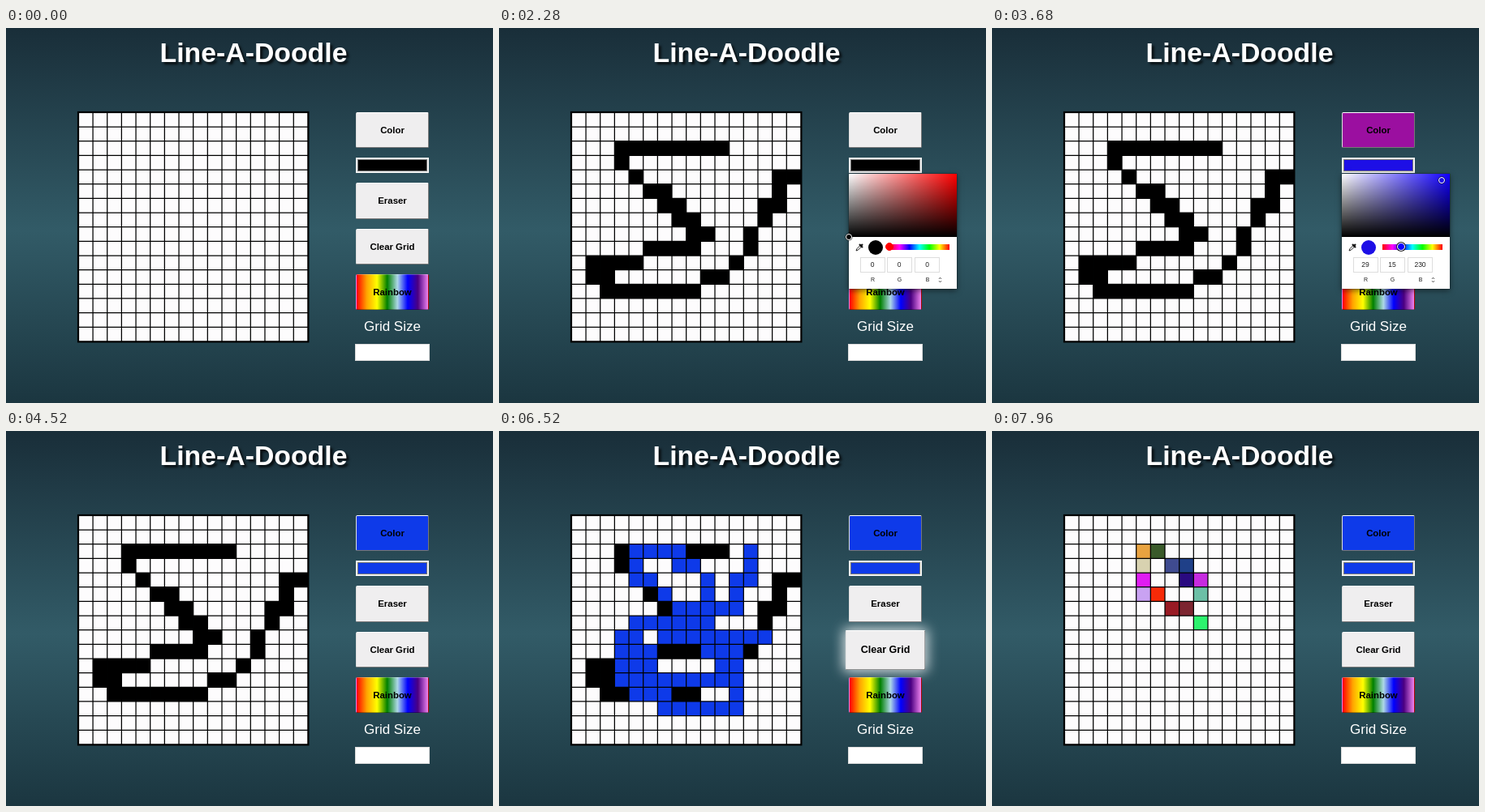
An HTML page for the animation above (8 s loop, 600 by 463 pixels).

```html
<!DOCTYPE html>
<html lang="en">
<head>
<meta charset="utf-8">
<title>Line-A-Doodle</title>
<style>
html, body { margin: 0; width: 100%; height: 100%; overflow: hidden; }
body { position: relative; font-family: "Liberation Sans", Arial, sans-serif;
  background: linear-gradient(#192e39, #325b67 54%, #1b3640); }
body > *, #picker > * { position: absolute; box-sizing: border-box; }
svg { left: 0; top: 0; width: 600px; height: 463px; overflow: visible; }
h1 { margin: 0; left: 5px; top: 10px; width: 600px; text-align: center; color: #fff;
  font: bold 33.8px/40px "Liberation Sans", Arial, sans-serif; text-shadow: 3px 3px 3px #000b; }
.btn { left: 431px; width: 90px; height: 44.5px; border: 1px solid; border-color: #fff #777 #777 #ddd;
  border-radius: 2px; background: #efeeef; color: #000; text-align: center;
  font-weight: bold; font-size: 11.4px; line-height: 42px; }
#rainbow { border-color: #fff4 #0005 #0005 #fff0;
  background: linear-gradient(90deg, red, orange, yellow, green, lightblue, blue, indigo, violet); }
#swatch { left: 431px; top: 160px; width: 90px; height: 19px; border: 2px solid #f2f2f2;
  box-shadow: inset 0 0 0 1px #777; }
#label { left: 426px; top: 358px; width: 100px; text-align: center; color: #fff; font-size: 17px; line-height: 22px; }
#size { left: 430px; top: 390px; width: 92px; height: 21px; background: #fff; border: 1px solid #ddd; }
#picker { left: 431px; top: 179.5px; width: 132.5px; height: 142px; background: #fff;
  box-shadow: 0 2px 7px #0008, 0 0 1px #000; }
#shade { left: 0; top: 0; width: 132.5px; height: 78.5px; }
#dot { width: 8px; height: 8px; border: 1.3px solid #fff; border-radius: 50%; box-shadow: 0 0 0 .7px #0009; }
#preview { left: 23.5px; top: 82px; width: 18.5px; height: 18.5px; border-radius: 50%; }
#hues { left: 49.5px; top: 87px; width: 74px; height: 7px;
  background: linear-gradient(270deg, red, #ff0, #0f0, #0ff, #00f, #f0f, red); }
#thumb { top: 85.5px; width: 10px; height: 10px; border: 1.5px solid #fff; border-radius: 50%; box-shadow: 0 0 0 1px #222; }
.field { top: 103.5px; width: 31px; height: 18.5px; border: 1px solid #ddd; font-size: 8.5px;
  line-height: 17px; text-align: center; color: #222; }
.channel { top: 126px; width: 31px; font-size: 7px; line-height: 10px; text-align: center; color: #222; }
#dropper, #spin { left: 0; top: 0; width: 132px; height: 142px; }
</style>
</head>
<body>
<h1>Line-A-Doodle</h1>
<svg id="board"></svg>
<div class="btn" id="color" style="top:103.5px">Color</div>
<div id="swatch"></div>
<div class="btn" style="top:191px">Eraser</div>
<div class="btn" id="clear" style="top:247.5px">Clear Grid</div>
<div class="btn" id="rainbow" style="top:303.5px">Rainbow</div>
<div id="label">Grid Size</div>
<div id="size"></div>
<div id="picker">
  <div id="shade"></div><div id="dot"></div>
  <svg id="dropper"><path d="M9 95l1-2.5 4-4 1.500 1.500-4 4z" fill="#fff" stroke="#222"/><path d="M13 87l4 4M15 89l2-2" stroke="#111" stroke-width="2.200"/></svg>
  <div id="preview"></div><div id="hues"></div><div id="thumb"></div>
  <svg id="spin"><path d="M111 130l1.500-2 1.500 2M111 132l1.500 2 1.500-2" fill="none" stroke="#444" stroke-width=".8"/></svg>
</div>
<script>
const LOOP = 8000, SIZE = 16, PITCH = 17.66, LEFT = 89.4, TOP = 104.4;
const CLEAR_AT = 6680, PICK_AT = 2560;
const BLUE = '#0e3ae9';
const $ = id => document.getElementById(id);

// Strokes pass through cells named by column letter and row number.
const strokes = [
  [200, 1600, '#000', 'k2 d2 d3 e4 f5 g5 g6 h6 h7 i7 i8 j8 i9 f9 e10 b10 b11 c11 c12 i12 j11 k11 l10 m9 m8 n7 n6 o6 o5 o4 p4'],
  [4600, 5000, BLUE, 'm2 m4 l4 l6 h6 g5 f4 e4 e2'],
  [5000, 5540, BLUE, 'e2 h2 h3 i3 j4 j7 e7 e8 d8 d9 e9 e10 f10 f11 k11 k8 j8'],
  [5600, 6280, BLUE, 'j8 g8 f9 d9 d10 d11 e11 e12 g12 g13 l13 l9 j9 k8 n8'],
  [7560, 7950, ['#2cf26e', '#7c2530', '#981a24', '#f62a08', '#c9a2f2', '#e01cf2', '#d8d2b0',
    '#e9a340', '#3a5a2a', '#3f4b90', '#1f4088', '#2a0a80', '#c72be0', '#6cbfa6'],
    'j7 i6 h6 g5 f5 f4 f2 g2 h3 i3 i4 j4 j5']
];

function trace(route) {
  const points = route.split(' ').map(s => [s.charCodeAt(0) - 97, +s.slice(1)]);
  const cells = [points[0]];
  for (const [x, y] of points.slice(1)) {
    let [cx, cy] = cells[cells.length - 1];
    while (cx !== x || cy !== y) {
      cx += Math.sign(x - cx);
      cy += Math.sign(y - cy);
      cells.push([cx, cy]);
    }
  }
  return cells;
}

const marks = strokes.flatMap(([start, end, color, route]) => {
  const cells = trace(route);
  return cells.map(([x, y], i) => ({
    time: start + (end - start) * i / (cells.length - 1),
    index: y * SIZE + x,
    color: Array.isArray(color) ? color[i] : color
  }));
});

function shape(name, attrs) {
  const node = document.createElementNS('http://www.w3.org/2000/svg', name);
  for (const key in attrs) node.setAttribute(key, attrs[key]);
  return $('board').appendChild(node);
}

const cells = Array.from({ length: SIZE * SIZE }, (_, i) => shape('rect', {
  x: LEFT + i % SIZE * PITCH, y: TOP + Math.floor(i / SIZE) * PITCH, width: PITCH, height: PITCH
}));
const span = SIZE * PITCH;
let lines = '';
for (let i = 1; i < SIZE; i++) {
  const at = i * PITCH;
  lines += `M${LEFT + at} ${TOP}v${span}M${LEFT} ${TOP + at}h${span}`;
}
shape('path', { d: lines, stroke: '#000', 'stroke-width': 1.25 });
shape('rect', { x: LEFT - .4, y: TOP - .4, width: span + .8, height: span + .8,
  fill: 'none', stroke: '#000', 'stroke-width': 2.2 });

const fields = [13.5, 46.5, 81].map((x, i) => {
  const add = (cls, left, text) => {
    const node = document.createElement('div');
    node.className = cls;
    node.style.left = left + 'px';
    node.textContent = text;
    return $('picker').appendChild(node);
  };
  add('channel', x + .5, 'RGB'[i]);
  return add('field', x, '');
});

// time, hue, saturation, value
const picks = [
  [PICK_AT, 360, .5, .9], [2820, 360, .6, .843], [2900, 360, .6, .843], [3240, 360, .935, .902],
  [3360, 360, .935, .902], [3600, 244, .935, .902], [3720, 244, .935, .902], [3900, 228, .94, .914]
];

function pickAt(t) {
  if (t < PICK_AT) return [0, 0, 0];
  const next = picks.findIndex(p => p[0] > t);
  if (next < 0) return picks[picks.length - 1].slice(1);
  const a = picks[next - 1], b = picks[next], k = (t - a[0]) / (b[0] - a[0]);
  return [1, 2, 3].map(i => a[i] + (b[i] - a[i]) * k);
}

function toRgb([h, s, v]) {
  return [5, 3, 1].map(n => {
    const k = (n + h / 60) % 6;
    return Math.round(255 * (v - v * s * Math.max(0, Math.min(k, 4 - k, 1))));
  });
}

const css = rgb => `rgb(${rgb.map(Math.round)})`;

// The button trails the chosen colour.
function buttonColor(t) {
  const sum = [0, 0, 0], steps = 20;
  for (let i = 0; i < steps; i++) {
    const at = t - 400 * i / steps;
    const rgb = at < PICK_AT ? [239, 238, 239] : toRgb(pickAt(at));
    rgb.forEach((c, j) => sum[j] += c / steps);
  }
  return css(sum);
}

function hover(node, t, enter, leave) {
  const ramp = x => Math.max(0, Math.min(1, x / 180));
  const k = ramp(t - enter) * (1 - ramp(t - leave));
  const e = k * k * (3 - 2 * k);
  node.style.transform = `scale(${1 + .1 * e})`;
  node.style.boxShadow = e ? `0 0 ${14 * e}px ${2 * e}px rgba(255,255,255,${.8 * e})` : 'none';
}

function drawPicker(t) {
  const pick = pickAt(t), rgb = toRgb(pick), color = css(rgb);
  $('swatch').style.background = color;
  $('color').style.background = buttonColor(t);
  $('picker').style.display = t >= 2040 && t < 4200 ? 'block' : 'none';
  const [h, s, v] = pick, pure = css(toRgb([h, 1, 1]));
  $('shade').style.background = `linear-gradient(transparent, #000), linear-gradient(90deg, #fff, ${pure})`;
  $('dot').style.left = s * 132 - 4 + 'px';
  $('dot').style.top = (1 - v) * 78 + .5 - 4 + 'px';
  $('dot').style.background = color;
  $('preview').style.background = color;
  $('thumb').style.left = 49.5 + (1 - (h || 360) / 360) * 73 - 5 + 'px';
  $('thumb').style.background = pure;
  $('thumb').style.borderColor = h % 360 ? '#fff' : pure;
  $('thumb').style.boxShadow = h % 360 ? '' : 'none';
  fields.forEach((f, i) => f.textContent = rgb[i]);
}

function render(t) {
  const fills = Array(SIZE * SIZE).fill('#fdfcfd');
  for (const m of marks) {
    if (m.time <= t && (t < CLEAR_AT || m.time > CLEAR_AT)) fills[m.index] = m.color;
  }
  cells.forEach((cell, i) => cell.setAttribute('fill', fills[i]));
  drawPicker(t);
  hover($('clear'), t, 6300, 6900);
  hover($('rainbow'), t, 6980, 7460);
}

const begin = performance.now();
function tick() {
  render((performance.now() - begin) % LOOP);
  requestAnimationFrame(tick);
}
tick();
</script>
</body>
</html>
```
